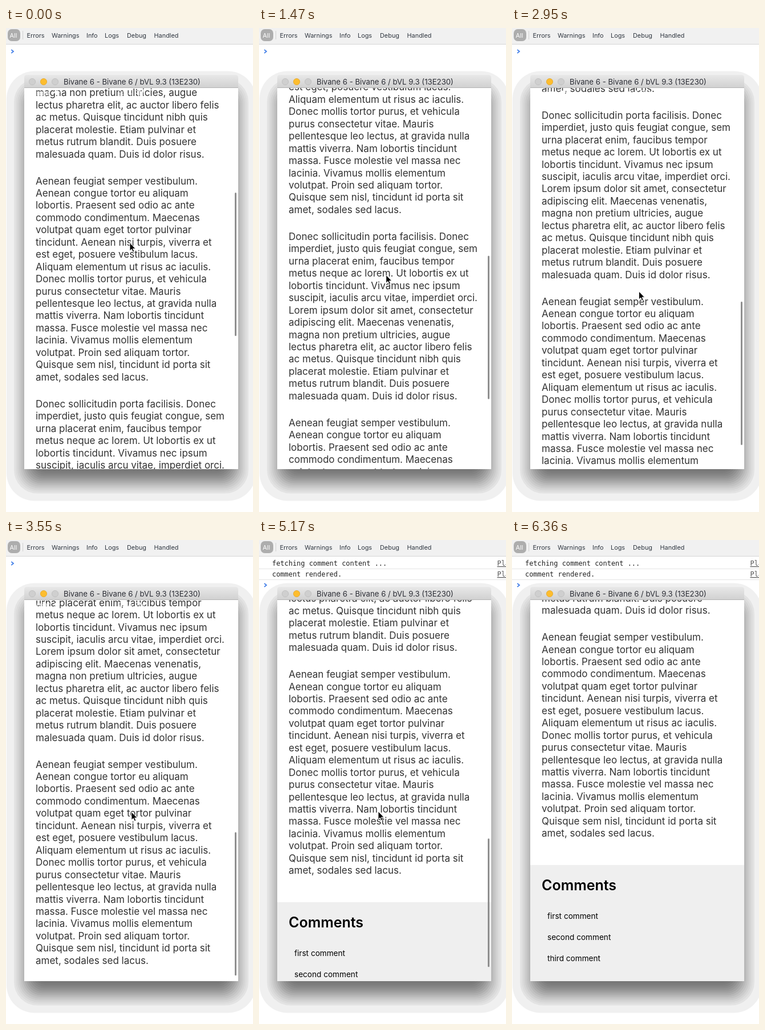
An HTML page that plays this animation: 433x847 px, repeating every 7260 ms.

```html
<!DOCTYPE html>
<html lang="en">
<head>
<meta charset="utf-8">
<title>Scroll to load comments</title>
<style>
  html, body { margin: 0; width: 100%; height: 100%; overflow: hidden; background: #fff; }
  svg { display: block; width: 433px; height: 847px; font-family: Inter, sans-serif; }
  text { white-space: pre; }
  .tab { font-size: 10.9px; fill: #303740; }
  .log { font: 11.95px "DejaVu Sans Mono", monospace; fill: #222; }
  .link { fill: #555; text-decoration: underline; }
  .title { font-size: 13.2px; fill: #2b2d35; }
  .body { font-size: 17px; fill: #333; }
  .heading { font-size: 25px; font-weight: 600; }
  .comment { font-size: 13.6px; }
  .status { font-size: 12px; fill: #fff; }
</style>
</head>
<body>
<svg id="stage" viewBox="0 0 433 847">
  <defs>
    <linearGradient id="bar" x2="0" y2="1">
      <stop stop-color="#e8e8e8"/><stop offset="1" stop-color="#d0d0d0"/>
    </linearGradient>
    <clipPath id="view"><rect x="32" y="105" width="375" height="667"/></clipPath>
  </defs>

  <g id="console"></g>
  <path id="prompt" d="M9.3 38l3.8 3-3.8 3" fill="none" stroke="#3f7de8" stroke-width="1.6"/>
  <rect width="433" height="28" fill="#f1f1f1"/>
  <path d="M0 28.5h433" stroke="#d6d6d6"/>
  <path d="M29.5 5v15" stroke="#d2d2d2"/>
  <rect x="3" y="2" width="22" height="21" rx="7" fill="#adadad"/>
  <g id="tabs"></g>

  <g id="shadow"></g>
  <rect x="32" y="105" width="375" height="667" fill="#fff"/>
  <path d="M32 105V87q0-5 5-5h365q5 0 5 5v18z" fill="url(#bar)"/>
  <path d="M32 104.5h375" stroke="#b4b4b4"/>
  <g stroke-width=".7">
    <circle cx="46" cy="94" r="5.6" fill="#cfcfcf" stroke="#b9b9b9"/>
    <circle cx="66" cy="94" r="5.6" fill="#fdbd2e" stroke="#e0a020"/>
    <circle cx="86" cy="94" r="5.6" fill="#cfcfcf" stroke="#b9b9b9"/>
  </g>
  <text class="title" x="101" y="99">Bivane 6 - Bivane 6 / bVL 9.3 (13E230)</text>

  <g clip-path="url(#view)">
    <g id="page"></g>
    <text class="status" x="38" y="118">Carrier</text>
    <path d="M83 112q6-5 12 0l-6 6z" fill="#fff"/>
    <text class="status" x="219.5" y="118" text-anchor="middle">9:24 PM</text>
    <rect x="377" y="109" width="24" height="10" rx="2" fill="#fff"/>
    <rect id="thumb" x="401" width="3" rx="1.5" fill="#8f8f8f"/>
  </g>
  <path id="cursor" d="M0 0v14l3.2-3 2.3 5 2.3-1-2.2-4.8h4.4z" stroke="#fff" stroke-width=".9"/>
</svg>

<script>
const LOOP = 7260, FETCHED = 3850, RENDERED = 4290;
const LINE = 21.45, PARAGRAPH = 47;

const paragraphs = [
`Donec sollicitudin porta facilisis. Donec
imperdiet, justo quis feugiat congue, sem
urna placerat enim, faucibus tempor
metus neque ac lorem. Ut lobortis ex ut
lobortis tincidunt. Vivamus nec ipsum
suscipit, iaculis arcu vitae, imperdiet orci.
Lorem ipsum dolor sit amet, consectetur
adipiscing elit. Maecenas venenatis,
magna non pretium ultricies, augue
lectus pharetra elit, ac auctor libero felis
ac metus. Quisque tincidunt nibh quis
placerat molestie. Etiam pulvinar et
metus rutrum blandit. Duis posuere
malesuada quam. Duis id dolor risus.`,
`Aenean feugiat semper vestibulum.
Aenean congue tortor eu aliquam
lobortis. Praesent sed odio ac ante
commodo condimentum. Maecenas
volutpat quam eget tortor pulvinar
tincidunt. Aenean nisi turpis, viverra et
est eget, posuere vestibulum lacus.
Aliquam elementum ut risus ac iaculis.
Donec mollis tortor purus, et vehicula
purus consectetur vitae. Mauris
pellentesque leo lectus, at gravida nulla
mattis viverra. Nam lobortis tincidunt
massa. Fusce molestie vel massa nec
lacinia. Vivamus mollis elementum
volutpat. Proin sed aliquam tortor.
Quisque sem nisl, tincidunt id porta sit
amet, sodales sed lacus.`].map(p => p.split("\n"));

// Time, scroll offset, cursor x, cursor y
const keys = [
  [0, 0, 217, 376], [880, 217, 221, 427], [2200, 377.5, 224, 438],
  [3550, 591, 220, 476], [FETCHED, 611, 217, 477], [RENDERED, 611, 213, 478],
  [4570, 652.5, 212, 478], [5160, 748.5, 209, 475], [5910, 808, 208, 478],
  [6210, 813.5, 206, 812], [6360, 813.5, 206, 830]
];

// Screen updates in whole hundredths of a second: first time, last time, count
const ticks = [0];
for (const [from, to, n] of [[150, 1180, 8], [1320, 2350, 8], [2500, 3400, 7],
                             [3550, 4570, 8], [4720, 5760, 8], [5910, 6360, 4]])
  for (let i = 0; i < n; i++)
    ticks.push(10 * Math.floor((from + (to - from) * i / (n - 1)) / 10));

const $ = id => document.getElementById(id);

function add(parent, tag, attrs, content = "") {
  const el = document.createElementNS("http://www.w3.org/2000/svg", tag);
  for (const name in attrs) el.setAttribute(name, attrs[name]);
  el.textContent = content;
  parent.append(el);
  return el;
}
const label = (parent, cls, x, y, content) => add(parent, "text", { class: cls, x, y }, content);

function buildTabs() {
  const tabs = { Errors: 36.5, Warnings: 80, Info: 141, Logs: 173, Debug: 212, Handled: 259.5 };
  for (const name in tabs) label($("tabs"), "tab", tabs[name], 17, name);
  label($("tabs"), "tab", 6.5, 17, "All").style.fill = "#fff";
}

function buildLogs() {
  return ["fetching comment content ...", "comment rendered."].map((message, i) => {
    const row = add($("console"), "g", { transform: `translate(0 ${i * 19})` });
    label(row, "log", 23, 45, message);
    label(row, "log link", 417.5, 45, "Play");
    add(row, "path", { d: "M0 50.5h433", stroke: "#e4e4e4" });
    return row;
  });
}

// Banded soft shadow: nested rounded boxes following a Gaussian edge
function buildShadow() {
  const spreads = [31];
  for (let d = 18; d >= -25; d -= 3) spreads.push(d);
  for (const d of spreads) {
    const coverage = 1 / (1 + Math.exp(1.7 * (d - 1.5) / 18.8));
    const grey = d === 31 ? 240 : Math.round(255 * (1 - 0.6 * coverage));
    add($("shadow"), "rect", {
      x: 32 - d, y: 106.5 - d, width: 375 + 2 * d, height: 690 + 2 * d,
      rx: 30 + d * 0.6, fill: `rgb(${grey},${grey},${grey})`
    });
  }
}

function buildPage() {
  const page = $("page");
  const [donec, aenean] = paragraphs;
  let y = 273.5 - PARAGRAPH - (donec.length - 1) * LINE;
  for (const lines of [donec, aenean, donec, aenean]) {
    lines.forEach((line, i) => label(page, "body", 52, y + i * LINE, line));
    y += (lines.length - 1) * LINE + PARAGRAPH;
  }
  const top = y + 2.5;
  const section = add(page, "g", { transform: `translate(0 ${top})` });
  add(section, "rect", { x: 32, width: 375, height: 203, fill: "#efefef" });
  label(section, "heading", 52, 44.5, "Comments");
  ["first", "second", "third"].forEach((nth, i) =>
    label(section, "comment", 62, 94.5 + i * 37, nth + " comment"));
  return section;
}

// Monotone cubic through one column of the keys
function track(t, col) {
  const last = keys.length - 1;
  if (t >= keys[last][0]) return keys[last][col];
  const i = keys.findIndex(k => k[0] > t) - 1;
  const secant = j => (keys[j + 1][col] - keys[j][col]) / (keys[j + 1][0] - keys[j][0]);
  const slope = j => {
    if (j === 0 || j === last) return 0;
    const a = secant(j - 1), b = secant(j);
    return a * b > 0 ? 2 * a * b / (a + b) : 0;
  };
  const h = keys[i + 1][0] - keys[i][0], u = (t - keys[i][0]) / h, v = 1 - u;
  return v * v * (1 + 2 * u) * keys[i][col] + u * u * (1 + 2 * v) * keys[i + 1][col]
       + h * u * v * (v * slope(i) - u * slope(i + 1));
}

buildTabs();
buildShadow();
const logs = buildLogs(), comments = buildPage();
const show = (el, on) => el.setAttribute("visibility", on ? "visible" : "hidden");

function draw(t) {
  const scroll = track(t, 1), loaded = t >= RENDERED;
  const rows = (t >= FETCHED) + loaded;
  $("page").setAttribute("transform", `translate(0 ${-scroll})`);
  show(comments, loaded);
  logs.forEach((row, i) => show(row, i < rows));
  $("prompt").setAttribute("transform", `translate(0 ${rows * 19})`);

  const thumb = $("thumb");
  thumb.setAttribute("y", loaded ? 272.7 + scroll * 0.3333 : 288 + scroll * 0.3777);
  thumb.setAttribute("height", loaded ? 225 : 251);
  thumb.setAttribute("opacity", Math.max(0, Math.min(1, (6360 - t) / 300)));

  $("cursor").setAttribute("transform", `translate(${track(t, 2)} ${track(t, 3)})`);
  show($("cursor"), t < 6360);
}

const start = performance.now();
function frame() {
  const t = (performance.now() - start) % LOOP;
  draw(ticks.filter(tick => tick <= t).pop());
  requestAnimationFrame(frame);
}
frame();
</script>
</body>
</html>
```
